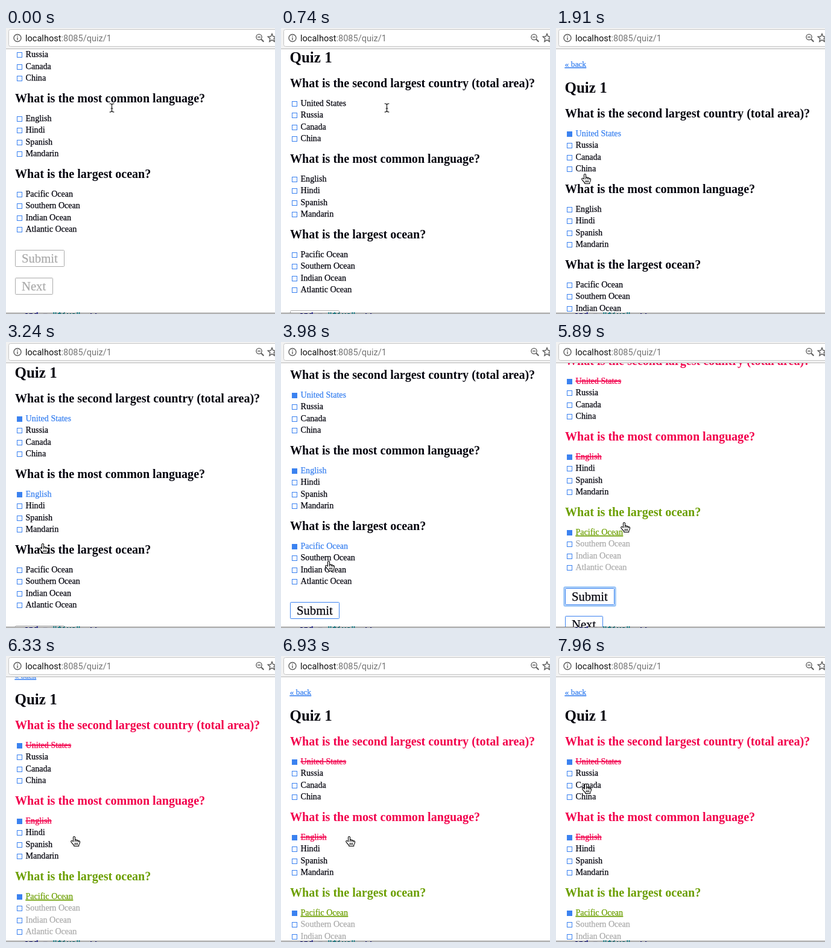
These frames come from a looping animation (446 by 473 pixels, 8000 ms). An HTML page:

```html
<!DOCTYPE html>
<html lang="en">
<head>
<meta charset="utf-8">
<title>Quiz 1</title>
<style>
  html, body { margin: 0; width: 100%; height: 100%; overflow: hidden; background: #fff; }
  svg { display: block; width: 446px; height: 473px; }
  text { white-space: pre; }
  #page text { font-family: "Liberation Serif", serif; stroke-width: .25; }
  #page .head { font-size: 20.08px; font-weight: bold; stroke: none; }
  #page .title { font-size: 25px; font-weight: bold; stroke: none; }
  .option { font-size: 14.1px; }
  .back { font-size: 13.5px; text-decoration: underline; }
  .label { font-size: 20.7px; }
  .url { font: 14.55px Roboto, sans-serif; }
  .code { font: bold 13px "DejaVu Sans Mono", monospace; }
</style>
</head>
<body>
<svg viewBox="0 0 446 473">
  <defs>
    <clipPath id="view"><rect y="35" width="446" height="436"/></clipPath>
    <clipPath id="under"><rect y="470" width="446" height="3"/></clipPath>
  </defs>
  <rect width="446" height="473" fill="#fff"/>
  <g clip-path="url(#view)"><g id="page"></g></g>

  <g id="toolbar">
    <rect width="446" height="34" fill="#f2f2f2"/>
    <rect y="34" width="446" height="1" fill="#b8b8b8"/>
    <rect x="4.5" y="2.5" width="460" height="28" rx="3" fill="#fff" stroke="#c6c6c6"/>
    <g fill="none" stroke="#5c5c5c" stroke-width="1.4">
      <circle cx="19" cy="16.5" r="6"/>
      <path d="M19 15.5v4.5M19 12.8v1.5"/>
      <circle cx="419.5" cy="15" r="4.6"/>
      <path d="M417 15h5"/>
      <path d="M423 18.5l4.3 4.3" stroke-width="2"/>
      <path d="M441 9.5l1.9 4.5 4.9.4-3.7 3.2 1.1 4.8-4.2-2.6-4.2 2.6 1.1-4.8-3.7-3.2 4.9-.4z"/>
    </g>
    <text class="url" x="32" y="21.5" fill="#111">localhost<tspan fill="#757575">:8085/quiz/1</tspan></text>
  </g>

  <rect y="471" width="446" height="1" fill="#707070"/>
  <rect y="472" width="446" height="1" fill="#e4e4e4"/>
  <g clip-path="url(#under)">
    <text class="code" x="30" y="479" fill="#25258c">end = <tspan fill="#16808a">"five"</tspan>  &gt;&gt;</text>
  </g>

  <g id="beam" fill="none" stroke-linecap="round">
    <path id="beamShape" d="M172 125q3 0 3.500 2q.5-2 3.500-2M175.500 127v10M172 139q3 0 3.500-2q.5 2 3.500 2M174 133h3" stroke="#111" stroke-width="1.100"/>
  </g>
  <g id="hand" stroke="#000" stroke-width="1.100" stroke-linejoin="round" stroke-linecap="round">
    <path fill="#fff" d="M-1.500 9V1.800Q-1.300.5 0 .5T1.500 1.800V6.500Q3.800 5 4.400 7Q6.600 6 7 8Q9.500 7.200 9.500 9.800Q9.500 12.500 7.700 14.500V16.500H-.3V15Q-2.500 13-5 9.600Q-5.800 8-4.300 7.500Q-3 7.200-1.500 9z"/>
    <path fill="none" d="M1.500 6.500V9M4.400 7V9M7 8V9.500M1.300 11.500V14M3.400 11.500V14M5.500 11.500V14"/>
  </g>
</svg>
<script>
const LOOP = 8000, TICK = 147.4;
const INK = '#05050f', BLUE = '#3b82f0', RED = '#f2004c', GREEN = '#6c9f00', GREY = '#aaa';
const $ = id => document.getElementById(id);
const page = $('page');

// Ticks at which things are clicked or change
const PICK = [11, 18, 25], SUBMIT = 33, NEXT_ON = 35;

// Rows of [tick, values...]
const SCROLL = [[2, 150], [3, 132], [4, 90], [5, 50], [6, 22], [7, 6], [8, 0],
  [19, 0], [20, 38], [21, 48], [26, 48], [27, 87], [28, 128], [29, 147],
  [38, 147], [39, 140], [40, 110], [41, 72], [42, 44], [43, 27],
  [44, 27], [45, 12], [46, 4], [47, 0]];
const POINTER = [[8, 90, 166], [9, 35, 172], [11, 35, 172], [13, 48, 241], [16, 42, 296],
  [17, 42, 299], [20, 42, 299], [24, 79, 366], [26, 79, 366], [27, 79, 362],
  [30, 79, 362], [32, 72, 381], [36, 72, 381], [37, 113, 298], [47, 113, 298],
  [52, 49, 199], [53, 49, 204], [54, 49, 211]];

const QUESTIONS = [
  ['What is the second largest country (total area)?', ['United States', 'Russia', 'Canada', 'China']],
  ['What is the most common language?', ['English', 'Hindi', 'Spanish', 'Mandarin']],
  ['What is the largest ocean?', ['Pacific Ocean', 'Southern Ocean', 'Indian Ocean', 'Atlantic Ocean']]
];
const RIGHT = 2;

function set(el, attrs) {
  for (const key in attrs) el.setAttribute(key, attrs[key]);
  return el;
}

function add(name, attrs, content = '') {
  const el = set(document.createElementNS('http://www.w3.org/2000/svg', name), attrs);
  el.textContent = content;
  return page.appendChild(el);
}

const paint = (el, colour) => set(el, { fill: colour, stroke: colour });

function write(cls, x, y, content, colour = INK) {
  return paint(add('text', { class: cls, x, y }, content), colour);
}

function button(y, width, label) {
  const box = add('rect', { x: 15.5, y: y + .5, width, height: 27, rx: 1, fill: '#fff' });
  return { box, text: write('label', 26, y + 20.5, label) };
}

function enable({ box, text }, on) {
  set(box, { stroke: on ? BLUE : GREY });
  paint(text, on ? INK : GREY);
}

write('back', 14.5, 64, '« back', BLUE);
write('title', 14.5, 107, 'Quiz 1');
const quiz = QUESTIONS.map(([title, names], q) => {
  const y = 142 + 125 * q;
  const head = write('head', 15, y + 6, title);
  const options = names.map((name, i) => {
    const mid = y + Math.round(33 + 19.4 * i);
    return {
      box: add('rect', { x: 18.5, y: mid - 3.5, width: 8, height: 8, stroke: BLUE, fill: '#fff' }),
      text: write('option', 32.5, mid + 4, name)
    };
  });
  return { head, options };
});
const ring = add('rect', { x: 13.5, y: 515.5, width: 85, height: 31, rx: 2, fill: 'none', stroke: '#9cc6f7', 'stroke-width': 2.5 });
const submit = button(517, 81, 'Submit');
const next = button(563, 62, 'Next');

function along(track, n) {
  if (n <= track[0][0]) return track[0].slice(1);
  const i = track.findIndex(row => row[0] >= n);
  if (i < 0) return track[track.length - 1].slice(1);
  const a = track[i - 1], b = track[i], k = (n - a[0]) / (b[0] - a[0]);
  return a.slice(1).map((v, j) => v + (b[j + 1] - v) * k);
}

function drawQuestion({ head, options }, q, n) {
  const done = n >= SUBMIT, picked = n >= PICK[q], right = q === RIGHT;
  const verdict = right ? GREEN : RED;
  paint(head, done ? verdict : INK);
  options.forEach(({ box, text }, i) => {
    const chosen = picked && i === 0;
    set(box, { fill: chosen ? BLUE : '#fff' });
    let colour = INK;
    if (chosen) colour = done ? verdict : BLUE;
    else if (done && right) colour = ['#444', '#888'][n - SUBMIT] || GREY;
    paint(text, colour);
    text.style.textDecoration = chosen && done ? (right ? 'underline' : 'line-through') : 'none';
  });
}

function draw(time) {
  const n = Math.floor((time % LOOP + 10) / TICK);
  const [x, y] = along(POINTER, n).map(Math.round);
  set(page, { transform: `translate(0 ${-along(SCROLL, n)[0]})` });
  quiz.forEach((item, q) => drawQuestion(item, q, n));
  enable(submit, n >= PICK[2]);
  enable(next, n >= NEXT_ON);
  set(ring, { visibility: n >= SUBMIT ? 'visible' : 'hidden' });
  set($('beam'), { visibility: n < 8 ? 'visible' : 'hidden' });
  set($('hand'), { visibility: n < 8 ? 'hidden' : 'visible', transform: `translate(${x} ${y})` });
}

const start = performance.now();
function frame() {
  draw(performance.now() - start);
  requestAnimationFrame(frame);
}
frame();
</script>
</body>
</html>
```
